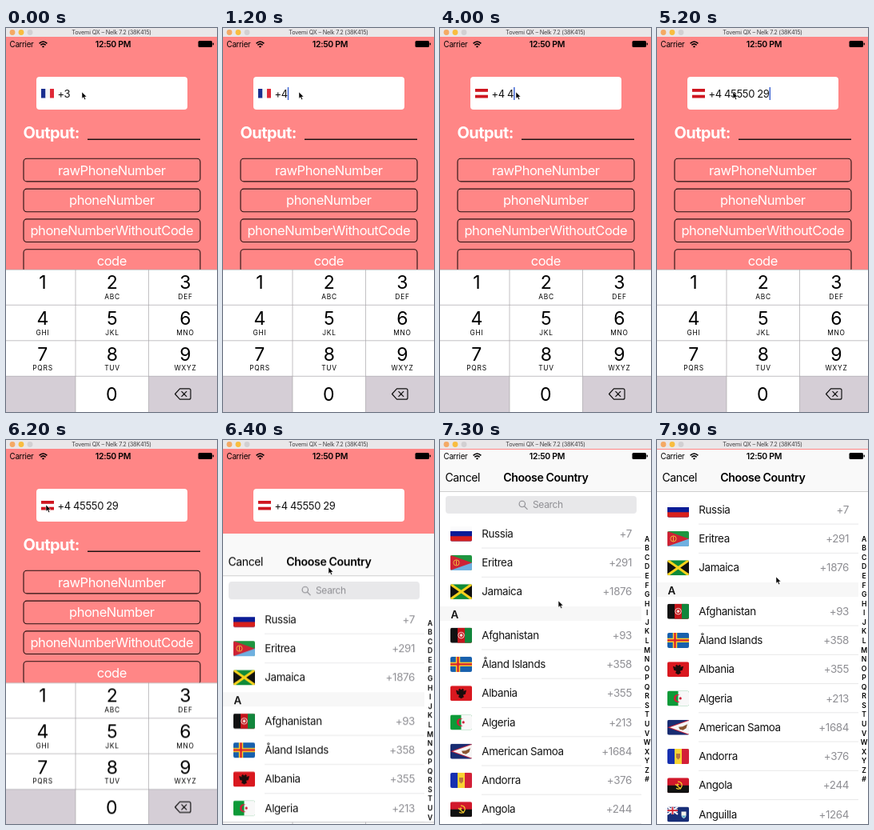
Animation, 264 px wide and 480 px high, one loop 8 s. Source, as an HTML page:

```html
<!DOCTYPE html>
<html lang="en">
<head>
<meta charset="utf-8">
<title>Phone input</title>
<style>
  html, body { margin: 0; width: 100%; height: 100%; overflow: hidden; background: #ff8686; }
  svg { display: block; width: 100vw; height: 100vh; }
  text { font-family: Inter, Roboto, sans-serif; letter-spacing: -.028em; }
  .mid { text-anchor: middle; }
  .end { text-anchor: end; }
  #modal, #keyboard, #list, #cursor { animation: 8s linear infinite; }
  #modal { animation-name: present; }
  #keyboard { animation-name: dismiss; }
  #list { animation-name: scroll; }
  #cursor { animation-name: point; }

  @keyframes present {
    0%, 78% { transform: translateY(469px); }
    78.75% { transform: translateY(345px); }
    80% { transform: translateY(106px); }
    81.25% { transform: translateY(25px); }
    82.5% { transform: translateY(5px); }
    83.75%, 100% { transform: translateY(0); }
  }
  @keyframes dismiss {
    0%, 77.5% { transform: translateY(0); }
    78.75% { transform: translateY(143px); }
    80% { transform: translateY(175.5px); }
    81.25%, 100% { transform: translateY(180px); }
  }
  @keyframes scroll {
    0%, 90% { transform: translateY(0); animation-timing-function: ease-in-out; }
    97%, 100% { transform: translateY(-32px); }
  }
  @keyframes point {
    0%, 68% { transform: translate(95px, 80px); animation-timing-function: ease-in-out; }
    75%, 77.6% { transform: translate(50px, 81px); }
    80% { transform: translate(132px, 159px); }
    83.75% { transform: translate(114px, 147px); animation-timing-function: ease-in-out; }
    90% { transform: translate(148px, 203px); animation-timing-function: ease-in-out; }
    97%, 100% { transform: translate(149px, 171px); }
  }
</style>
</head>
<body>
<svg viewBox="0 0 264 480" preserveAspectRatio="none">
  <defs><clipPath id="flagClip"><rect width="27" height="19" rx="2"/></clipPath></defs>

  <rect width="264" height="480" fill="#ff8686"/>
  <rect x="38" y="61" width="189" height="41" rx="4" fill="#fff"/>
  <g id="france">
    <path d="M44 76h5.5v11.5H44z" fill="#1b2f8f"/>
    <path d="M49.5 76H55v11.5h-5.5z" fill="#f4f4f4"/>
    <path d="M55 76h5v11.5h-5z" fill="#e02a38"/>
  </g>
  <g id="austria">
    <path d="M44 76h16v11.5H44z" fill="#cf1620"/>
    <path d="M44 79.8h16v3.9H44z" fill="#fff"/>
  </g>
  <text id="number" x="64.5" y="86.6" font-size="13" fill="#111"></text>
  <rect id="caret" y="74" width="1.5" height="16" fill="#3f66d4"/>
  <text x="21.5" y="138" font-size="20" font-weight="700" fill="#fff">Output:</text>
  <path d="M102 139.2H243" stroke="#1d1212" stroke-width="1.5"/>
  <g id="buttons" font-size="16.5" fill="#fff"></g>

  <g id="modal">
    <rect y="12" width="264" height="480" fill="#fff"/>
    <g id="list">
      <rect x="7" y="72" width="239" height="22" rx="4" fill="#e8e8ea"/>
      <g fill="none" stroke="#8a8a8f" stroke-width="1.1">
        <circle cx="102.8" cy="82" r="3.7"/><path d="M105.5 84.8l4 4"/>
      </g>
      <text x="116" y="87.4" font-size="12" fill="#8e8e93">Search</text>
      <rect y="210" width="252" height="18" fill="#f7f7f7"/>
      <text x="13.5" y="224.5" font-size="13.4" font-weight="600" fill="#111">A</text>
      <g id="rows" font-size="13.4"></g>
    </g>
    <g id="index" class="mid" font-size="8.6" font-weight="600"></g>
    <rect y="12" width="264" height="52.5" fill="#f9f9f9"/>
    <path d="M0 64.5H264" stroke="#bcbcbc" stroke-width=".7"/>
    <text x="6.5" y="52.2" font-size="14">Cancel</text>
    <text x="132.3" y="52.2" font-size="14.2" font-weight="600" class="mid">Choose Country</text>
  </g>

  <g id="keyboard">
    <rect y="302" width="264" height="178" fill="#fff"/>
    <path d="M0 435.3h87V480H0zM178.5 435.3H264V480H178.5z" fill="#d5ced6"/>
    <path d="M0 302.2H264M0 346.3H264M0 390.8H264M0 435.3H264M87 302V480M178.5 302V480" stroke="#aaa6ab" stroke-width=".7"/>
    <g id="keys" class="mid"></g>
    <path d="M217.5 450.8H229q2 0 2 2v9.4q0 2-2 2h-11.5l-6-6.7zM219.5 454.2l6.6 6.6M226.1 454.2l-6.6 6.6" fill="none" stroke="#111" stroke-width="1.2" stroke-linejoin="round"/>
  </g>

  <text x="4.6" y="23.6" font-size="9.7">Carrier</text>
  <g fill="none" stroke="#000" stroke-width="1.6">
    <path d="M41.6 19.3q4.9-4.6 9.8 0M43.4 21.4q3.1-2.9 6.2 0"/>
    <path d="M45.4 23.3h2.2" stroke-width="1.9"/>
  </g>
  <text x="134" y="23.7" font-size="10.5" font-weight="600" class="mid">12:50 PM</text>
  <rect x="240.5" y="16" width="17.5" height="8" rx="1.6"/>
  <rect x="258.6" y="18.6" width="1.3" height="2.8" rx=".6"/>

  <rect width="264" height="11" fill="#e9e7e9"/>
  <circle cx="8" cy="5.5" r="3.4" fill="#f4a964"/>
  <circle cx="19" cy="5.5" r="3.4" fill="#f8bd3f"/>
  <circle cx="30" cy="5.5" r="3.4" fill="#d2d0d2"/>
  <text x="132" y="8.2" font-size="7.3" fill="#454345" class="mid">Tovemi QX – Nelk 7.2 (38K415)</text>

  <path id="cursor" d="M0 0V8.2L1.9 6.5 3.2 9.5 4.7 8.9 3.4 6H6z" fill="#000" stroke="#fff" stroke-width=".5"/>
</svg>
<script>
const $ = id => document.getElementById(id);
const fill = (id, items, draw) => $(id).innerHTML = items.map(draw).join('');
const shape = (d, color) => `<path d="${d}" fill="${color}"/>`;
const line = (d, color, width) => `<path d="${d}" fill="none" stroke="${color}" stroke-width="${width}"/>`;
const dot = (x, y, r, color) => `<circle cx="${x}" cy="${y}" r="${r}" fill="${color}"/>`;
const ring = (x, y, r, color) => `<circle cx="${x}" cy="${y}" r="${r}" fill="none" stroke="${color}"/>`;
const bands = (...colors) => colors.map((color, i) =>
  shape(`M0 ${i * 19 / colors.length}H27V19H0z`, color)).join('');
const columns = (...colors) => colors.map((color, i) =>
  shape(`M${i * 27 / colors.length} 0V19H27V0z`, color)).join('');

const countries = [
  ['Russia', '+7', bands('#fbfbfc', '#0a1c96', '#d8201c')],
  ['Eritrea', '+291', bands('#1f9540', '#6fb0e0') + shape('M0 0L27 9.5 0 19z', '#cf2234')
    + ring(7.5, 9.5, 3.6, '#efb83c') + line('M7.5 6.5v6', '#efb83c', 1)],
  ['Jamaica', '+1876', bands('#0f8a38') + shape('M0 0L13.5 9.5 0 19zM27 0L13.5 9.5 27 19z', '#111')
    + line('M0 0L27 19M27 0L0 19', '#f8d31c', 3)],
  ['Afghanistan', '+93', columns('#111', '#c4161c', '#12863c')
    + ring(13.5, 9.5, 3.8, '#f3d9d4') + dot(13.5, 9.5, 1.8, '#f3d9d4')],
  ['Åland Islands', '+358', bands('#1860ad') + line('M0 9.5H27M9.5 0V19', '#fbd12c', 5.4)
    + line('M0 9.5H27M9.5 0V19', '#d72030', 2.4)],
  ['Albania', '+355', bands('#d9181f')
    + shape('M13.5 5l2-1.5 1.5 1.8-1 1.5 4-1.2-1.2 5-3 1 1.2 2.4-3.5 2-3.5-2 1.2-2.4-3-1L7 5.6l4 1.2-1-1.5 1.5-1.8z', '#1c0c0c')],
  ['Algeria', '+213', columns('#0d9a38', '#f8f8f8')
    + shape('M16.5 6A5 5 0 1 0 16.5 13 4 4 0 1 1 16.5 6z', '#d31c38') + dot(16.2, 9.5, 1.6, '#d31c38')],
  ['American Samoa', '+1684', bands('#182c72') + shape('M27 0L0 9.5 27 19z', '#c4243a')
    + shape('M27 1L3 9.5 27 18z', '#f6f6f6') + shape('M14 9l5-.5 6-3-1.5 5-4 2.5-4-1z', '#8a5530')],
  ['Andorra', '+376', columns('#1730b0', '#f8d333', '#d32038')
    + shape('M11 6h5v5l-2.5 2.5L11 11z', '#b9743e')],
  ['Angola', '+244', bands('#d1182b', '#111') + line('M13 5a4.5 4.5 0 1 1-2 8M10 8l7 6', '#f5cb2c', 1.3)
    + dot(13, 8.5, 1.2, '#f5cb2c')],
  ['Anguilla', '+1264', bands('#182e78') + line('M0 0L13 9.5M13 0L0 9.5', '#fff', 2)
    + line('M6.5 0V9.5M0 4.7H13', '#fff', 3.4) + line('M6.5 0V9.5M0 4.7H13', '#d0202f', 1.8)
    + shape('M17.5 6h6v4q0 3-3 4.5-3-1.5-3-4.5z', '#f6f4ec') + shape('M18 11h5q-.5 2-2.5 3-2-1-2.5-3z', '#56aeca')]
];

fill('buttons', ['rawPhoneNumber', 'phoneNumber', 'phoneNumberWithoutCode', 'code'], (label, i) => {
  const y = 163.3 + i * 37.8;
  return `<rect x="22" y="${y}" width="221" height="28.6" rx="4" fill="none" stroke="#241010" stroke-width="1.1"/>
    <text x="132.3" y="${y + 20.2}" class="mid">${label}</text>`;
});

fill('keys', ['', 'ABC', 'DEF', 'GHI', 'JKL', 'MNO', 'PQRS', 'TUV', 'WXYZ', null], (letters, i) => {
  const x = letters === null ? 132 : [45.5, 132.5, 224][i % 3];
  const y = letters === null ? 465.7 : 326.3 + Math.floor(i / 3) * 44.6;
  return `<text x="${x}" y="${y}" font-size="23">${(i + 1) % 10}</text>
    <text x="${x + .5}" y="${y + 12.6}" font-size="8.4" style="letter-spacing:.09em">${letters || ''}</text>`;
});

fill('rows', countries, ([name, code, flag], i) => {
  const y = 119 + i * 36.25 + (i > 2 ? 18.2 : 0);
  const rule = i === 2 ? '' : line(`M52 ${y + 18.1}H252`, '#dedee0', .7);
  return `<g transform="translate(13 ${y - 9.3})" clip-path="url(#flagClip)">${flag}</g>
    <text x="52.3" y="${y + 4.8}" fill="#111">${name}</text>
    <text x="240" y="${y + 4.8}" fill="#8e8e93" class="end">${code}</text>${rule}`;
});

fill('index', [...'ABCDEFGHIJKLMNOPQRSTUVWXYZ#'], (letter, i) =>
  `<text x="259" y="${126.8 + i * 11.56}">${letter}</text>`);

// Field contents after each edit, with the time of the edit in ms
const edits = [
  [-600, '+3'], [650, '+'], [1050, '+4'], [1350, '+43'], [3050, '+4'], [3650, '+4 4'],
  [4150, '+4 45'], [4350, '+4 455'], [4550, '+4 4555'], [4750, '+4 45550'],
  [4950, '+4 45550 2'], [5150, '+4 45550 29']
];
const number = $('number'), caret = $('caret');

function tick() {
  const t = performance.now() % 8000;
  const [since, value] = edits.findLast(([time]) => time <= t);
  if (number.textContent !== value) number.textContent = value;
  $('france').style.display = t < 1350 ? '' : 'none';
  $('austria').style.display = t < 1350 ? 'none' : '';
  caret.setAttribute('x', 64.5 + number.getComputedTextLength());
  caret.style.display = t < 6200 && (t - since) % 1000 < 550 ? '' : 'none';
  requestAnimationFrame(tick);
}
tick();
</script>
</body>
</html>
```
